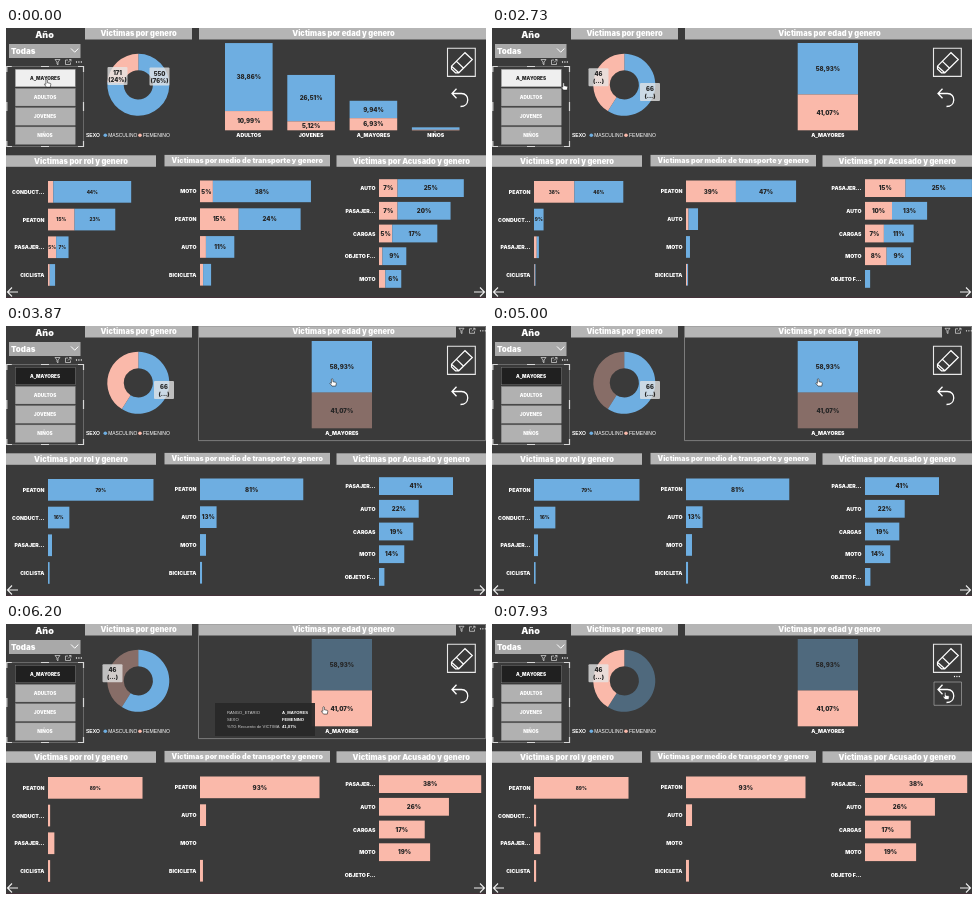
Recreate the animation shown at these times as an HTML page. Size 480 px wide and 270 px high, loop 8000 ms.

```html
<!DOCTYPE html>
<html lang="es">
<head>
<meta charset="utf-8">
<style>
  html, body { margin: 0; width: 100%; height: 100%; overflow: hidden; background: #3a3a3a; }
  svg { display: block; width: 100vw; height: 100vh; }
  text { font-family: Inter, "Liberation Sans", sans-serif; font-weight: 900; }
  .plain { font-family: "Liberation Sans", Arial, sans-serif; font-weight: 400; }
  .strong { font-family: "Liberation Sans", Arial, sans-serif; font-weight: 700; }
</style>
</head>
<body>
<svg viewBox="0 0 480 270"><g id="still"></g><g id="live"></g></svg>
<script>
const LOOP = 8000;
const BLUE = '#6eaee1', PINK = '#fab9aa', GREY = '#b5b5b5', INK = '#262626', WHITE = '#fff';
const DIM = 0.4;

// Moments at which the dashboard is filtered
const FILTERED = 1730, MALE_PICKED = 3800, FEMALE_PICKED = 6130;

const CHARTS = [
  { x: 42, y: 153, step: 27.7, h: 21.7, size: 4.6, minLabel: 8 },
  { x: 194, y: 152.5, step: 27.8, h: 21.7, size: 6, minLabel: 12 },
  { x: 373, y: 151.2, step: 22.7, h: 17.8, size: 6, minLabel: 12 },
];

// Per state and chart: pixels per percent, then "name female male"
const BARS = [
  [
    [1.77, 'CONDUCT... 3 44', 'PEATON 15 23', 'PASAJER... 4.6 7', 'CICLISTA 1 3'],
    [2.58, 'MOTO 5 38', 'PEATON 15 24', 'AUTO 2.3 11', 'BICICLETA 1.2 3.1'],
    [2.65, 'AUTO 7 25', 'PASAJER... 7 20', 'CARGAS 5 17', 'OBJETO_F... 1.3 9', 'MOTO 2.4 6'],
  ], [
    [1.063, 'PEATON 38 46', 'CONDUCT... 0 9', 'PASAJER... 2.6 2', 'CICLISTA .7 .7'],
    [1.28, 'PEATON 39 47', 'AUTO 2 7.4', 'MOTO 0 3.1', 'BICICLETA .8 .8'],
    [2.7, 'PASAJER... 15 24.6', 'AUTO 10 13', 'CARGAS 7 11', 'MOTO 8 9', 'OBJETO_F... 0 1.9'],
  ], [
    [1.335, 'PEATON 0 79', 'CONDUCT... 0 16', 'PASAJER... 0 3', 'CICLISTA 0 1.2'],
    [1.275, 'PEATON 0 81', 'AUTO 0 13', 'MOTO 0 4.7', 'BICICLETA 0 1.6'],
    [1.805, 'PASAJER... 0 41', 'AUTO 0 22', 'CARGAS 0 19', 'MOTO 0 14', 'OBJETO_F... 0 3'],
  ], [
    [1.062, 'PEATON 89 0', 'CONDUCT... 2 0', 'PASAJER... 6 0', 'CICLISTA 2 0'],
    [1.285, 'PEATON 93 0', 'AUTO 4.7 0', 'MOTO 0 0', 'BICICLETA 2.3 0'],
    [2.69, 'PASAJER... 38 0', 'AUTO 26 0', 'CARGAS 17 0', 'MOTO 19 0', 'OBJETO_F... 0 0'],
  ],
];

const AGES = [['ADULTOS', 10.99, 38.86], ['JOVENES', 5.12, 26.51], ['A_MAYORES', 6.93, 9.94], ['NIÑOS', 0.3, 1.4]];

// time, x, y
const POINTER = [
  [0, 41.5, 55.5], [2610, 41.5, 55.5], [2730, 72, 58.5], [3100, 225, 61], [3470, 327, 56.5],
  [5000, 327, 56.5], [5670, 318.5, 86.5], [7130, 318.5, 86.5], [7930, 454, 72], [8000, 454, 72],
];

const clamp = v => Math.max(0, Math.min(1, v));
const ease = v => v * v * (3 - 2 * v);
const ramp = (t, from, to) => ease(clamp((t - from) / (to - from)));

const rect = (x, y, w, h, fill, extra = '') =>
  w > 0 && h > 0 ? `<rect x="${x}" y="${y}" width="${w}" height="${h}" fill="${fill}" ${extra}/>` : '';
const line = (d, color = WHITE, width = 1) =>
  `<path d="${d}" fill="none" stroke="${color}" stroke-width="${width}"/>`;
const text = (s, x, y, size, fill = WHITE, anchor = 'middle', cls = '') =>
  `<text x="${x}" y="${y}" font-size="${size}" fill="${fill}" text-anchor="${anchor}" class="${cls}">${s}</text>`;
const centred = (s, x, y, size, fill) => text(s, x, y + size * 0.36, size, fill);
const dots = (x, y) => [0, 2.4, 4.8].map(d => `<circle cx="${x + d}" cy="${y}" r=".65" fill="#fff"/>`).join('');

const title = (s, x, y, w, size = 7.5, middle = x + w / 2) =>
  rect(x, y, w, 11.5, GREY) + text(s, middle, y + 8.4, size);

const visualIcons = (x, y) =>
  line(`M${x} ${y - 2.5}h5l-2 2.5v2.8l-1-.8v-2z`, '#ddd', 0.7) +
  line(`M${x + 13} ${y - 2}h-2.5v4.5h5v-2M${x + 13} ${y + .5}l3-3m-2 0h2v2`, '#ddd', 0.7) +
  dots(x + 21.5, y);

function drawStill() {
  const row2 = 127.3;
  return rect(0, 0, 480, 270, '#3a3a3a') + rect(0, 269, 480, 1, '#45323a') +
    text('Año', 38.5, 9.6, 9) +
    rect(3, 16, 71.5, 14, '#a9a9a9') + text('Todas', 5, 26.3, 8, WHITE, 'start') +
    line('M65 20.5l3.7 3.7l3.7-3.7') + visualIcons(49, 34) +
    line('M.6 38.5H77.5V118.5H.6Z', '#8a8a8a', 0.6) +
    line('M.8 44v-5.5h5M72 38.5h5.5v5.5M77.5 113v5.5h-5.5M6 118.5h-5.2v-5.5M35 38.5h8M35 118.5h8M.8 74v9M77.5 74v9', '#d8d8d8', 1.2) +
    title('Victimas por genero', 79, 0, 107) +
    title('Victimas por rol y genero', 0, row2, 150) +
    title('Victimas por medio de transporte y genero', 158.5, row2 - .4, 165.5, 7.1) +
    title('Victimas por Acusado y genero', 330.5, row2, 149.5) +
    text('SEXO', 80, 109, 5, WHITE, 'start', 'strong') +
    `<circle cx="99.3" cy="107.2" r="1.8" fill="${BLUE}"/><circle cx="134" cy="107.2" r="1.8" fill="${PINK}"/>` +
    text('MASCULINO', 102.2, 109, 4.9, WHITE, 'start', 'plain') +
    text('FEMENINO', 137, 109, 5.1, WHITE, 'start', 'plain') +
    line('M441.5 20.3H469.3V48.4H441.5Z', '#e8e8e8', 1.1) +
    line('M445.5 38.2L459 24.7L466.3 31.5L452.8 44.8H449.5L445.5 41ZM450.5 33.4L457.6 40.2M445.5 38.2L452.8 44.8', WHITE, 1.2) +
    line('M450.5 60.8L446 65.5L450.5 70.2M446 65.5H455.5C464 65.5 464 78.5 454.5 78.5', WHITE, 1.3) +
    line('M6 259.5L1.5 264L6 268.5M1.5 264H12M474 259.5L478.5 264L474 268.5M478.5 264H468', '#eee', 1.1);
}

function slicer(state, hovered) {
  return ['A_MAYORES', 'ADULTOS', 'JOVENES', 'NIÑOS'].map((name, i) => {
    const y = 41.3 + i * 19.2;
    let fill = '#b1b1b1', ink = WHITE;
    if (i === 0 && hovered) [fill, ink] = ['#efefef', INK];
    else if (i === 0 && state > 0) fill = '#202020';
    return rect(9.3, y, 60, 17.5, fill, 'stroke="#888" stroke-width=".4"') + centred(name, 39, y + 8.8, 4.7, ink);
  }).join('');
}

function slice(from, to, fill, opacity) {
  const at = (turn, r) => {
    const a = turn * 2 * Math.PI;
    return `${(132.3 + r * Math.sin(a)).toFixed(2)} ${(56.8 - r * Math.cos(a)).toFixed(2)}`;
  };
  const big = to - from > 0.5 ? 1 : 0, R = 31, r = 14.6;
  return `<path d="M${at(from, R)}A${R} ${R} 0 ${big} 1 ${at(to, R)}L${at(to, r)}A${r} ${r} 0 ${big} 0 ${at(from, r)}Z" fill="${fill}" opacity="${opacity}"/>`;
}

const callout = (a, b, x, y) =>
  rect(x - 10, y - 9, 20, 18, '#e6e6e6', 'opacity=".78" rx="1"') +
  text(a, x, y - 1, 5.8, INK) + text(b, x, y + 6, 5.8, INK);

function donut(t, state) {
  const male = 0.763 + (0.589 - 0.763) * ramp(t, FILTERED - 40, FILTERED + 200);
  const swap = ramp(t, 6210, 6420);
  const maleAlpha = 1 - (1 - DIM) * swap;
  const femaleAlpha = 1 - (1 - DIM) * (ramp(t, 3880, 4100) - swap);
  let out = slice(0, male, BLUE, maleAlpha) + slice(male, 1, PINK, femaleAlpha);
  if (state === 0) return out + callout('171', '(24%)', 111.5, 48) + callout('550', '(76%)', 153.5, 48.5);
  if (state !== 2) out += callout('46', '(...)', 106.5, 49.3);
  if (state !== 3) out += callout('66', '(...)', 158, 64);
  return out;
}

function columns(state) {
  const base = 102.3;
  const column = (name, female, male, x, w, scale) => {
    const low = female * scale, high = male * scale;
    const label = (v, y) => v > 2 ? centred(v.toFixed(2).replace('.', ',') + '%', x + w / 2, y, 6, INK) : '';
    return rect(x, base - low - high, w, high, BLUE, state === 3 ? `opacity="${DIM}"` : '') +
      rect(x, base - low, w, low, PINK, state === 2 ? `opacity="${DIM}"` : '') +
      label(male, base - low - high / 2) + label(female, base - low / 2) +
      text(name, x + w / 2, 109, 5.2);
  };
  if (state > 0) return column('A_MAYORES', 41.07, 58.93, 305.7, 60.3, 0.873);
  return AGES.map(([name, f, m], i) => column(name, f, m, 219 + i * 62.3, 47.6, 1.75)).join('');
}

function barChart(chart, [scale, ...rows]) {
  return rows.map((row, i) => {
    const [name, female, male] = row.split(' ');
    const y = chart.y + i * chart.step, mid = y + chart.h / 2;
    const bar = (value, x, fill) => {
      const w = value * scale;
      return rect(x, y, w, chart.h, fill) +
        (w >= chart.minLabel ? centred(Math.round(value) + '%', x + w / 2, mid, chart.size, INK) : '');
    };
    return text(name.replace('_', ' '), chart.x - 3.5, mid + 2, 5.2, WHITE, 'end') +
      bar(+female, chart.x, PINK) + bar(+male, chart.x + female * scale, BLUE);
  }).join('');
}

function tooltip(alpha) {
  const rows = [['RANGO_ETARIO', 'A_MAYORES'], ['SEXO', 'FEMENINO'], ['%TG Recuento de VICTIMA', '41,07%']];
  return `<g opacity="${alpha}">` + rect(209, 79, 100, 33, '#292929', 'opacity=".95"') +
    rows.map(([key, value], i) =>
      text(key, 221, 90.4 + i * 6.9, 4.2, '#d0d0d0', 'start', 'plain') +
      text(value, 276, 90.4 + i * 6.9, 4.2, WHITE, 'start', 'strong')).join('') + '</g>';
}

function pointerAt(t) {
  const i = POINTER.findIndex((p, k) => k > 0 && t <= p[0]);
  const [t0, x0, y0] = POINTER[i - 1], [t1, x1, y1] = POINTER[i];
  const k = (t - t0) / (t1 - t0);
  const p = t > 4900 ? ease(k) : k;
  return [x0 + (x1 - x0) * p, y0 + (y1 - y0) * p];
}

const hand = (x, y) =>
  `<path transform="translate(${x.toFixed(2)} ${y.toFixed(2)})" d="M-1.6-3.3q.8-1 1.5 0V-.8L2.6-.2q.8.2.7 1L2.8 3.6H-1L-3.2.8q.4-.9 1.6 0Z" fill="#fff" stroke="#222" stroke-width=".6"/>`;

function drawLive(t) {
  const state = [FILTERED, MALE_PICKED, FEMALE_PICKED].filter(m => t >= m).length;
  const [x, y] = pointerAt(t);
  const overColumns = x > 192 && x < 442, overUndo = x >= 442;
  const tip = x < 366 ? ramp(t, 6000, 6130) : 0;

  let out = slicer(state, x < 76) + title('Victimas por edad y genero', 193, 0, overColumns ? 257 : 287, 7.5, 337.5);
  if (overColumns) out += line('M192.5 .4H479.6V114.6H192.5Z', '#9a9a9a', 0.7) + visualIcons(453, 4.8);
  if (overUndo) out += line('M442 58H469.5V81.3H442Z', '#a5a5a5', 0.7) + dots(462.5, 52.5);
  out += donut(t, state) + columns(state);
  CHARTS.forEach((chart, i) => out += barChart(chart, BARS[state][i]));
  if (tip > 0) out += tooltip(tip);
  return out + hand(x, y);
}

const live = document.getElementById('live');
let shown = '';
document.getElementById('still').innerHTML = drawStill();

function render(now) {
  const markup = drawLive(now % LOOP);
  if (markup !== shown) live.innerHTML = shown = markup;
}

const start = performance.now();
function tick() {
  render(performance.now() - start);
  requestAnimationFrame(tick);
}
tick();
</script>
</body>
</html>
```
